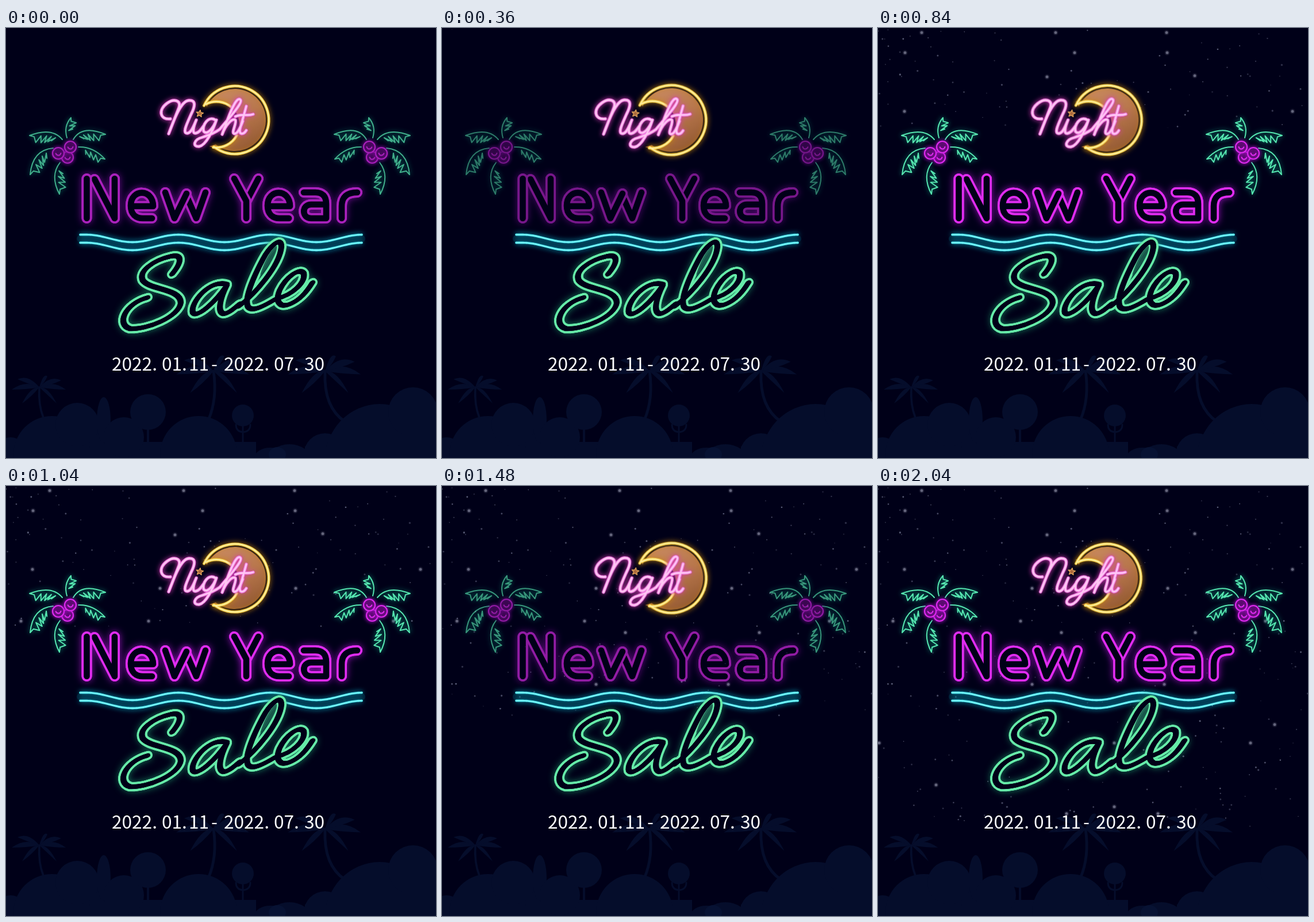
Animation, 748 px wide and 748 px high, one loop 2.08 s. Source, as an HTML page with a canvas:

```html
<!DOCTYPE html>
<html lang="en">
<head>
<meta charset="utf-8">
<title>New Year Sale</title>
<style>
html, body { margin: 0; width: 100%; height: 100%; overflow: hidden; background: #000018; }
canvas { display: block; width: 748px; height: 748px; }
</style>
</head>
<body>
<canvas id="stage" width="748" height="748"></canvas>
<script>
const SIZE = 748, LOOP = 2080, STEP = 40;
const NIGHT = '#000018', SHADE = '#050d2b';
const PURPLE = '#e02cf0', GREEN = '#66eaa8', MINT = '#56e6b0', CYAN = '#4cebf2';
const ctx = document.getElementById('stage').getContext('2d');

function layer(paint) {
  const c = document.createElement('canvas');
  c.width = c.height = SIZE;
  const g = c.getContext('2d');
  g.lineCap = g.lineJoin = 'round';
  paint(g);
  return c;
}

function glow(g, color, blur) {
  g.shadowColor = color;
  g.shadowBlur = blur;
}

function line(g, path, color, width) {
  g.strokeStyle = color;
  g.lineWidth = width;
  g.stroke(path);
}

function disc(g, x, y, rx, ry = rx) {
  g.beginPath();
  g.ellipse(x, y, rx, ry, 0, 0, Math.PI * 2);
  g.fill();
}

function random(seed) {
  return () => {
    seed = (seed * 1664525 + 1013904223) >>> 0;
    return seed / 4294967296;
  };
}

// ---- landscape ----
function shadePalm(g, x, y, s, trunk) {
  const tips = [[-48, 4], [-38, -14], [-30, 28], [14, -19], [46, 4], [38, -12], [30, 28], [2, 36]];
  for (const [dx, dy] of tips) {
    const px = x + dx * s, py = y + dy * s;
    const mx = x + dx * s * 0.5, my = y + dy * s * 0.5 - 7 * s;
    g.beginPath();
    g.moveTo(x, y);
    g.quadraticCurveTo(mx, my - 9 * s, px, py);
    g.quadraticCurveTo(mx + 2 * s, my + 9 * s, x, y);
    g.fill();
  }
  line(g, new Path2D(trunk), SHADE, 3.6 * s);
}

const land = layer(g => {
  g.fillStyle = NIGHT;
  g.fillRect(0, 0, SIZE, SIZE);
  g.fillStyle = SHADE;
  shadePalm(g, 58, 625, 1, 'M58 625Q56 655 65 678');
  shadePalm(g, 361, 597, 1.35, 'M361 597Q368 645 352 682');
  shadePalm(g, 555, 597, 1.35, 'M555 597Q552 660 590 685');
  g.fillRect(0, 720, 435, 28);
  g.fillRect(100, 698, 118, 30);
  disc(g, 8, 740, 28);
  disc(g, 80, 742, 67);
  disc(g, 124, 690, 38);
  disc(g, 170, 682, 12, 40);
  disc(g, 205, 712, 35);
  disc(g, 247, 668, 31);
  g.fillRect(245, 695, 4, 40);
  disc(g, 335, 742, 67);
  disc(g, 412, 674, 19);
  line(g, new Path2D('M412 690V740M412 703Q400 702 400 690M412 703Q425 702 425 690'), SHADE, 3);
  disc(g, 460, 748, 28, 18);
  disc(g, 493, 752, 38, 28);
  disc(g, 555, 742, 37);
  disc(g, 650, 755, 96, 101);
  disc(g, 708, 668, 43);
  g.fillRect(520, 728, 228, 20);
  g.fillRect(690, 680, 58, 68);
  g.fillStyle = '#071233';
  disc(g, 472, 742, 15, 13);
});

// ---- stars ----
const BRIGHT = [
  76, 8, 309, 8, 502, 8, 47, 43, 342, 43, 503, 43, 294, 85, 551, 83, 46, 145, 721, 145,
  504, 178, 268, 178, 26, 235, 674, 235, 248, 235, 319, 255, 552, 255, 268, 345, 498, 345,
  236, 447, 411, 447, 648, 447, 2, 447, 101, 520, 328, 570, 487, 570, 411, 558, 265, 415, 690, 415
];
const stars = layer(g => {
  const rnd = random(29);
  for (let i = 0; i < 290; i++) {
    const light = 0.18 + rnd() * 0.32;
    g.fillStyle = `rgba(180,185,215,${light})`;
    disc(g, rnd() * SIZE, rnd() * 600, 0.7 + rnd());
  }
  for (let i = 0; i < BRIGHT.length; i += 2) {
    const x = BRIGHT[i], y = BRIGHT[i + 1];
    g.fillStyle = 'rgba(150,152,180,.14)';
    disc(g, x, y, 4.5);
    g.fillStyle = 'rgba(165,167,190,.55)';
    disc(g, x, y, 2.5);
  }
});

// ---- neon palms and heading ----
function frond(g, x0, y0, cx, cy, x1, y1, depth, teeth) {
  const p = new Path2D();
  p.moveTo(x0, y0);
  p.quadraticCurveTo(cx, cy, x1, y1);
  const side = Math.sign(depth), reach = Math.abs(depth);
  for (let i = 1; i <= teeth * 2; i++) {
    const u = 1 - i / (teeth * 2 + 1.5), v = 1 - u;
    const x = v * v * x0 + 2 * u * v * cx + u * u * x1;
    const y = v * v * y0 + 2 * u * v * cy + u * u * y1;
    const tx = v * (cx - x0) + u * (x1 - cx), ty = v * (cy - y0) + u * (y1 - cy);
    const n = Math.hypot(tx, ty), d = reach * (i % 2 ? 0.35 : 1) * (0.6 + 0.4 * Math.sin(Math.PI * u));
    const lean = i % 2 ? 0 : 6;
    p.lineTo(x - side * ty / n * d + tx / n * lean, y + side * tx / n * d + ty / n * lean);
  }
  line(g, p, MINT, 2);
}

function neonPalm(g) {
  glow(g, '#0c8f76', 8);
  frond(g, 106, 191, 100, 171, 113, 156, 15, 3);
  frond(g, 117, 194, 132, 168, 173, 185, 18, 5);
  frond(g, 126, 207, 152, 206, 172, 228, 15, 4);
  frond(g, 98, 194, 80, 172, 41, 187, -19, 5);
  frond(g, 82, 209, 46, 212, 42, 255, -20, 5);
  frond(g, 94, 234, 76, 257, 93, 289, -18, 4);
  glow(g, '#a818c8', 7);
  for (const [x, y] of [[107, 225], [91, 218], [112, 207]]) {
    g.fillStyle = '#4a0a5c';
    disc(g, x, y, 10);
    g.strokeStyle = PURPLE;
    g.lineWidth = 2.2;
    g.stroke();
    g.beginPath();
    g.arc(x, y - 1, 4.5, 0.2, Math.PI * 0.9);
    g.stroke();
  }
  g.shadowBlur = 0;
}

const E = 'M219 310H256C256 279 217 279 217 309C217 324 226 331 238 331H254';
const TUBES = [
  ['M154 263L189 331V262', 0], ['M140.5 262V331', 0],
  [E, 0],
  ['M313 290L331 331L347 286', 0], ['M277 286L293 331L314 288', 0],
  ['M439 262L419 300', 0], ['M397 262L418 301V331', 0],
  [E, 238],
  ['M518 286H538Q557 286 557 306V331H531C514 331 514 307 531 307H555', 0],
  ['M584 331V310Q584 286 611 286', 0]
];

const blink = layer(g => {
  neonPalm(g);
  g.save();
  g.translate(744, 0);
  g.scale(-1, 1);
  neonPalm(g);
  g.restore();

  const tubes = TUBES.map(([d, dx]) => {
    const p = new Path2D();
    p.addPath(new Path2D(d), new DOMMatrix([1, 0, 0, 1, dx, 0]));
    return p;
  });
  glow(g, '#8a10ac', 13);
  for (const p of tubes) line(g, p, PURPLE, 18);
  g.shadowBlur = 0;
  for (const p of tubes) {
    line(g, p, PURPLE, 18);
    line(g, p, NIGHT, 10.6);
  }
});

// ---- waves, script and dates ----
function wave(shift) {
  const p = new Path2D();
  for (let x = 129; x <= 619; x += 2) {
    const phase = Math.max(0, x - 140) / 160 * Math.PI * 2;
    p.lineTo(x, 366 + shift - 6.5 * Math.cos(phase));
  }
  return p;
}

const SCRIPT = new Path2D(
  'M289 428C309 404 304 393 287 397C256 404 230 423 238 439C250 456 304 453 304 478C301 502 246 525 216 523C191 516 207 479 246 469' +
  'M384 446C355 436 320 478 325 495C333 506 366 474 384 448C372 472 367 495 379 497C387 497 398 487 406 480' +
  'M405 484C432 464 476 414 479 381C479 360 458 381 447 402C429 436 414 472 421 485C428 495 450 483 468 472' +
  'M470 471C500 464 521 442 518 427C511 416 488 432 476 456C467 478 478 486 492 481C511 474 523 459 533 443');

// A slanted flat nib: the stroke swells across the slant.
function nib(g, color, width) {
  for (let k = -1; k <= 1; k += 0.25) {
    g.save();
    g.translate(k * 1.8, -k * 0.9);
    line(g, SCRIPT, color, width);
    g.restore();
  }
}

const DATES = [['2022.', 184], ['01.', 271], ['11', 318], ['-', 357], ['2022.', 379], ['07.', 466], ['30', 519]];

const front = layer(g => {
  line(g, wave(7), 'rgba(4,72,92,.4)', 12);
  glow(g, '#0c93ae', 10);
  for (const s of [0, 14]) {
    line(g, wave(s), CYAN, 3.8);
    line(g, wave(s), '#8cf9fb', 1.4);
  }
  glow(g, '#157a5a', 13);
  line(g, SCRIPT, GREEN, 15);
  g.shadowBlur = 0;
  nib(g, GREEN, 14.5);
  nib(g, NIGHT, 6.6);
  g.fillStyle = 'rgba(25,88,76,.9)';
  g.fill(new Path2D('M442 430C448 408 462 382 471 379C473 390 460 412 442 430Z'));

  g.fillStyle = '#fff';
  g.font = '31.6px "Noto Sans CJK KR", "Noto Sans CJK JP", "Noto Sans CJK SC", "Noto Sans CJK", sans-serif';
  for (const [word, x] of DATES) g.fillText(word, x, 596);
});

// ---- moon sign ----
const WORD = new Path2D(
  'M286 158C268 160 264 143 280 131C292 122 305 126 301 138L283 184' +
  'C292 160 304 127 318 126C332 125 328 138 322 150C314 168 306 184 316 183C322 182 326 172 331 160' +
  'C326 172 323 184 330 183C336 182 340 176 344 170' +
  'M364 160C352 152 340 170 344 180C350 187 361 174 366 160C360 178 348 204 336 206C324 207 326 194 342 190C354 186 364 182 372 176' +
  'C392 152 412 130 408 125C402 118 392 142 386 158L376 185C382 168 394 156 399 160C402 166 390 184 398 184C404 183 408 172 412 162' +
  'M418 136L407 176C405 186 413 186 418 178M399 154C411 148 419 154 430 150');

function arc(x, y, r, from, to) {
  const p = new Path2D();
  p.arc(x, y, r, from * Math.PI / 180, to * Math.PI / 180);
  return p;
}

const sign = layer(g => {
  const tan = g.createLinearGradient(370, 105, 430, 215);
  tan.addColorStop(0, '#c98a62');
  tan.addColorStop(0.5, '#b8774c');
  tan.addColorStop(1, '#8f5630');
  const crescent = arc(398, 160, 54, -155, 128);
  crescent.arc(366, 168, 40, Math.PI * 0.6, -Math.PI * 0.65, true);
  g.fillStyle = tan;
  g.fill(crescent);

  const rims = [arc(398, 160, 59, -155, 128), arc(366, 168, 40, -117, -48), arc(366, 168, 40, 28, 98)];
  glow(g, '#c8860c', 10);
  for (const p of rims) line(g, p, '#f5cf48', 4.8);
  g.shadowBlur = 0;
  for (const p of rims) line(g, p, '#fff0a4', 2);

  glow(g, '#d838b4', 9);
  line(g, WORD, '#f07ce0', 5.4);
  g.shadowBlur = 0;
  line(g, WORD, '#ffc8f4', 2.8);

  g.beginPath();
  for (let i = 0; i < 10; i++) {
    const a = i * Math.PI / 5 - Math.PI / 2 + 0.15, r = i % 2 ? 3 : 6.5;
    g.lineTo(337 + r * Math.cos(a), 149 + r * Math.sin(a));
  }
  g.closePath();
  g.fillStyle = '#a8683c';
  g.fill();
  g.strokeStyle = '#f0b060';
  g.lineWidth = 1.2;
  g.stroke();
});

// ---- motion ----
const GLOW_KEYS = [[0, 0.76], [290, 0.45], [360, 0.53], [640, 0.83], [840, 1], [1090, 1],
  [1390, 0.54], [1480, 0.65], [1720, 0.86], [1900, 1], [2080, 1]];

function brightness(t) {
  const i = GLOW_KEYS.findIndex(k => k[0] > t);
  const [t0, a] = GLOW_KEYS[i - 1], [t1, b] = GLOW_KEYS[i];
  return a + (b - a) * (t - t0) / (t1 - t0);
}

function draw(now) {
  const t = Math.floor(now % LOOP / STEP) * STEP;
  ctx.drawImage(land, 0, 0);

  const edge = Math.round((t - 352) * 0.357);
  if (edge > 0) ctx.drawImage(stars, 0, 0, SIZE, edge, 0, 0, SIZE, edge);

  ctx.globalAlpha = brightness(t);
  ctx.drawImage(blink, 0, 0);
  ctx.globalAlpha = 1;
  ctx.drawImage(front, 0, 0);

  const scale = 1 + 0.027 * Math.abs(Math.sin(Math.PI * t / (LOOP / 2)));
  ctx.save();
  ctx.translate(364, 160);
  ctx.scale(scale, scale);
  ctx.drawImage(sign, -364, -160);
  ctx.restore();
}

function tick() {
  draw(performance.now());
  requestAnimationFrame(tick);
}
tick();
</script>
</body>
</html>
```
